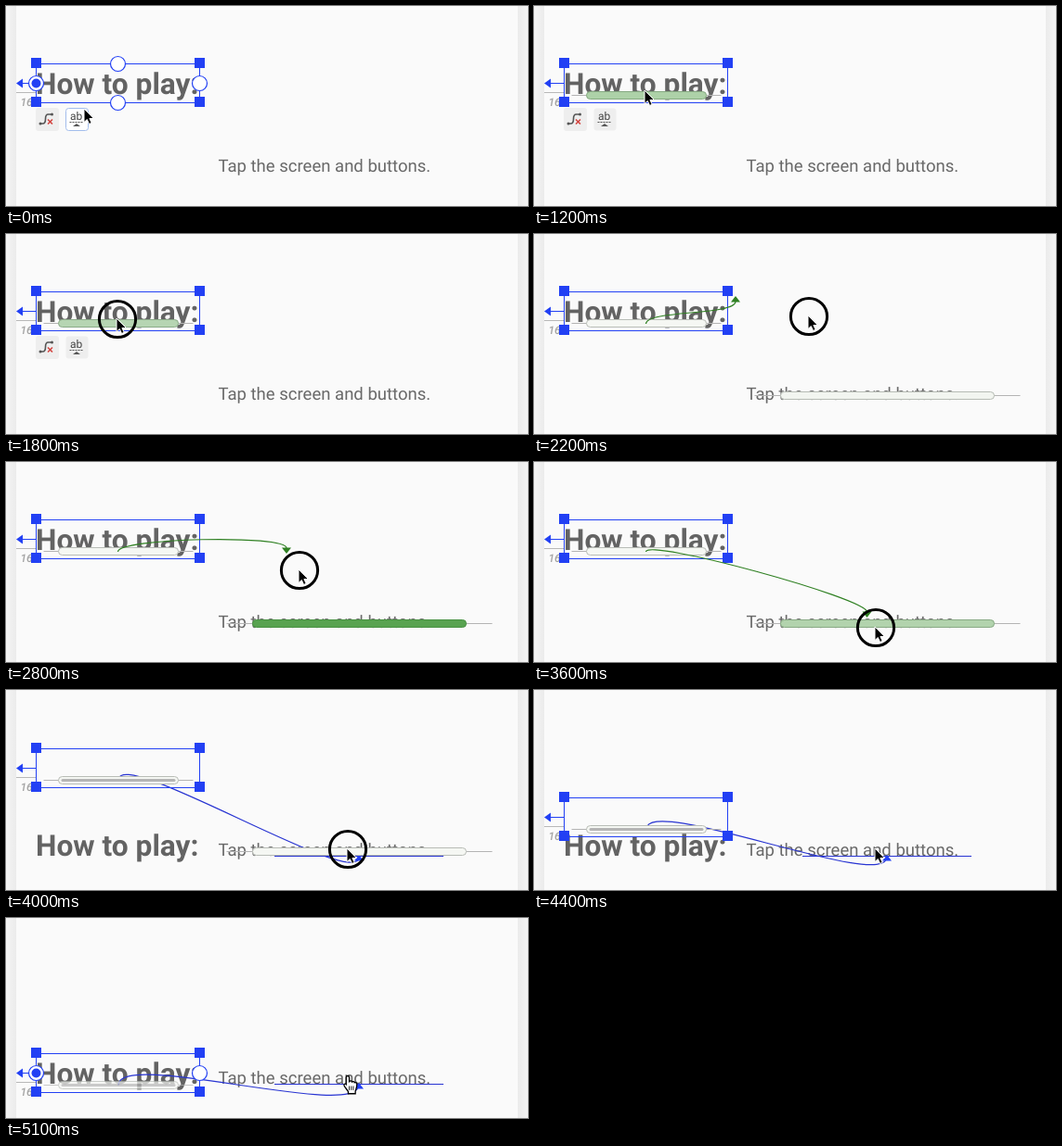
Write an HTML page that moves like this. It is 562x216 px and loops after 6100 ms.

```html
<!DOCTYPE html>
<html lang="en">
<head>
<meta charset="utf-8">
<title>Baseline constraint</title>
<style>
html, body { margin: 0; width: 100%; height: 100%; overflow: hidden; background: #fafafa; }
svg { display: block; width: 562px; height: 216px; font-family: Roboto, Arial, sans-serif; text-rendering: geometricPrecision; }
</style>
</head>
<body>
<svg id="stage" viewBox="0 0 562 216"></svg>
<script>
const LOOP = 6100, STEP = 100;
const BLUE = '#2240f4', LINK = '#2834d2', GREEN = '#2f8022';
const stage = document.getElementById('stage');

// Pointer tip: time, x, y
const PATH = [
  [0, 84, 111], [600, 84, 111], [1100, 119, 91], [1900, 119, 91], [2000, 160, 60],
  [2100, 217, 67], [2200, 295, 88], [2600, 296, 88], [2700, 302, 99], [2800, 315, 116],
  [3100, 326, 130], [3200, 333, 138], [3600, 367, 178], [3800, 367, 171], [LOOP, 367, 171]
];

const clamp = v => Math.max(0, Math.min(1, v));
const mix = (a, b, k) => a + (b - a) * k;
const smooth = k => k * k * (3 - 2 * k);
const pulse = (t, start) => 0.5 - 0.5 * Math.cos(2 * Math.PI * (t - start) / 1100);
const tint = (a, b, k) => `rgb(${a.map((v, i) => Math.round(mix(v, b[i], k)))})`;

function pointer(t) {
  const i = PATH.findIndex((p, n) => n && t <= p[0]);
  const [a, b] = [PATH[i - 1], PATH[i]];
  const k = (t - a[0]) / (b[0] - a[0]);
  return [mix(a[1], b[1], k), mix(a[2], b[2], k)];
}

const line = (x1, x2, y, color) => `<path d="M${x1} ${y}H${x2}" stroke="${color}"/>`;
const text = (x, y, size, fill, str, more = '') =>
  `<text x="${x}" y="${y}" font-size="${size}" fill="${fill}" ${more}>${str}</text>`;
const triangle = (x, y, dir, color) =>
  `<path d="M${x} ${y}l5 ${6.5 * dir}h-10z" fill="${color}"/>`;
const circle = (x, y, r, fill, stroke = 'none', w = 1) =>
  `<circle cx="${x}" cy="${y}" r="${r}" fill="${fill}" stroke="${stroke}" stroke-width="${w}"/>`;

function page() {
  return `<defs>
    <linearGradient id="edge"><stop stop-color="#f4f4f4"/><stop offset="1" stop-color="#ebebeb"/></linearGradient></defs>
    <rect width="562" height="216" fill="#fafafa"/>
    <rect width="11" height="216" fill="url(#edge)"/>
    <rect width="11" height="216" fill="url(#edge)" transform="matrix(-1 0 0 1 562 0)"/>`;
}

function pill(x1, x2, y, glow, linked, opacity = 1) {
  const mid = (x1 + x2) / 2, half = (x2 - x1) / 2;
  const arm = half > 100 ? 28 : 16;
  const fill = tint([245, 247, 243], [88, 163, 80], glow);
  const edge = tint([184, 188, 182], [72, 146, 66], glow);
  return `<g opacity="${opacity}">` + line(mid - half - arm, mid + half + arm, y, '#b4b4b4') +
    `<rect x="${x1}" y="${y - 4}" width="${x2 - x1}" height="8" rx="4" fill="${fill}" stroke="${edge}"/>` +
    (linked ? `<rect x="${x1 + 3}" y="${y - 1.5}" width="${x2 - x1 - 6}" height="3" rx="1.5" fill="#b5b5b5"/>` : '') +
    '</g>';
}

function margin(dy) {
  const y = 83.5 + dy;
  return line(11, 32, y + 10, '#b8b8b8') +
    text(15.5, y + 24.5, 12, '#a3a3a3', '16', 'font-style="italic" font-weight="500"') +
    `<path d="M32 ${y}H18" stroke="${BLUE}"/>
     <path d="M11 ${y}l7-5v10z" fill="${BLUE}"/>`;
}

function selection(dy) {
  let out = `<rect x="32.5" y="${62.5 + dy}" width="176" height="42" fill="none" stroke="${BLUE}"/>`;
  for (const x of [27, 203]) for (const y of [56, 98])
    out += `<rect x="${x}" y="${y + dy}" width="11" height="11" fill="${BLUE}"/>`;
  return out;
}

function anchors(dy, vertical) {
  const spots = [[32.5, 83.5], [208.5, 83.5]];
  if (vertical) spots.push([120.5, 62.5], [120.5, 104.5]);
  return spots.map(([x, y]) => circle(x, y + dy, 8, '#fff', BLUE, 1.2)).join('') +
    circle(32.5, 83.5 + dy, 5, BLUE);
}

function buttons(hover) {
  const look = hover ? 'fill="#fff" stroke="#a3bdec"' : 'fill="#eee"';
  return `<rect x="32" y="110" width="25" height="25" rx="3" fill="#eee"/>
    <path d="M37.5 127h2c6 0 0-10 6-10h4" fill="none" stroke="#555" stroke-width="1.6"/>
    ${circle(37, 127, 1.5, '#555')}${circle(49.5, 117, 1.5, '#555')}
    <path d="M45 122.5l5 5m0-5l-5 5" stroke="#d2403c" stroke-width="1.5"/>
    <rect x="64.5" y="110.5" width="24" height="24" rx="3" ${look}/>
    ${text(69, 122.5, 12, '#444', 'ab')}
    <path d="M68.5 125.5h15" stroke="#555" stroke-dasharray="2 1"/>
    <path d="M76 127l4 3h-8z" fill="#555"/>`;
}

function curve(x, y, x2, y2, up, pull, color) {
  return `<path d="M${x} ${y}C${x} ${y - pull} ${x2} ${y2 + up * pull} ${x2} ${y2}" fill="none" stroke="${color}" stroke-width="1.2"/>`;
}

function arrow(x, y) {
  return `<path d="M${x} ${y}v14.5l3.3-3 2.3 5 2.6-1.2-2.3-4.8h4.6z" fill="#000" stroke="#fff"/>`;
}

function hand(x, y) {
  return `<g transform="translate(${x} ${y}) scale(1.1)" stroke="#000">
    <path d="M2.5 1.5c0-2 3-2 3 0v4c1-1 2.5-.6 2.7.4 1-.8 2.3-.3 2.5.7 1.2-.5 2.3.2 2.3 1.6 0 4-1 5-1.5 6.8v2.5h-7v-2c-1-2-3.2-4-4-6-.6-1.5 1-2.2 2-1.2z" fill="#fff" stroke-width="1.2"/>
    <path d="M5.5 10v4m2-4v4m2-4v4" stroke-width=".8"/></g>`;
}

function draw(t) {
  const linked = t >= 3900, editing = t >= 700 && t < 5100;
  const dy = Math.round(84 * smooth(clamp((t - 3950) / 750)));
  const [px, py] = pointer(t);
  const pressed = t >= 200 && t < 600 || t >= 1300 && t < 4100;
  const dragging = t >= 2000 && !linked;

  let out = page() +
    text(32, linked ? 179.3 : 95.3, 31.7, '#636363', 'How to play:', 'font-weight="700"') +
    text(228.4, 179, 18.54, '#696969', 'Tap the screen and buttons.') +
    margin(dy);

  if (linked) out += line(289, 471, 179.5, LINK) +
    curve(121, 96.5 + dy, 380, 180, 1, 39, LINK) + triangle(380, 178, 1, BLUE);
  if (t >= 700)
    out += pill(56.5, 185.5, 96.5 + dy, t < 2000 ? pulse(t, 940) : 0, linked, t < 5100 ? 1 : 0.7);
  if (t >= 2000 && t < 4200)
    out += pill(265.5, 495.5, 174.5, linked ? 0 : pulse(t, 2250), false);
  out += selection(dy);
  if (!editing) out += anchors(dy, t < 700);
  if (t < 2000) out += buttons(t < 600);

  // The loose end trails the pointer by one step
  if (dragging && t > 2000) {
    const [x, y] = pointer(t - STEP);
    const up = y < 97 ? 1 : -1;
    out += curve(120.5, 97, x, y + 6 * up, up, 15, GREEN) + triangle(x, y, up, GREEN);
  }
  if (pressed) out += t < 600
    ? circle(86, 115.5, 18.5, 'none', '#000', 3)
    : circle(px + 1, py + 1, 19.6, 'none', '#000', 3);
  stage.innerHTML = out + (t < 5100 ? arrow(px, py) : hand(363.5, 170.5));
}

let shown = -1;
function tick() {
  const t = Math.floor(performance.now() % LOOP / STEP) * STEP;
  if (t !== shown) draw(shown = t);
  requestAnimationFrame(tick);
}
tick();
</script>
</body>
</html>
```
